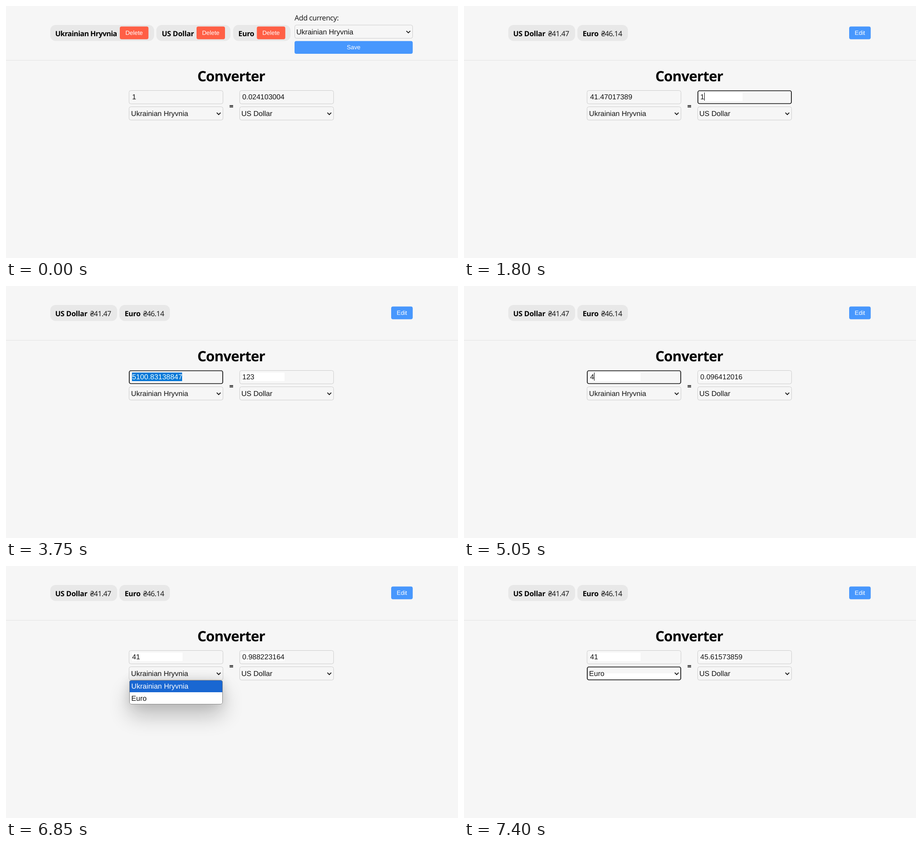
An HTML page that plays this animation: 1001x559 px, repeating every 8 s.

```html
<!DOCTYPE html>
<html lang="en">
<head>
<meta charset="utf-8">
<title>Currency converter</title>
<style>
  html, body { margin: 0; width: 100%; height: 100%; overflow: hidden; background: #f6f6f6; }
  svg { display: block; width: 1001px; height: 559px; }
  text { font: 16px "Liberation Sans", Arial, sans-serif; fill: #111; white-space: pre; text-rendering: geometricPrecision; }
  .ui { font-family: "Open Sans", "Noto Sans", sans-serif; }
  .bold { font-weight: 700; fill: #000; }
  .title { font-size: 31.5px; letter-spacing: -0.9px; }
  .btn { font-size: 13.333px; fill: #fff; }
  .mid { text-anchor: middle; }
  .box { fill: none; stroke: #cdcdcd; }
  .ring { fill: none; stroke: #101010; stroke-width: 1.7; }
  .arrow { fill: none; stroke: #111; stroke-width: 1.8; }
</style>
</head>
<body>
<svg id="stage" viewBox="0 0 1001 559"></svg>
<script>
const LOOP = 8000;
const DIGIT = 16 * 0.556, DOT = 16 * 0.278;
const SELECTION = '#0078d7', BLUE = '#4797fd', RED = '#ff5f45';
const FIELDS = {
  left: { x: 272, textX: 279.2 },
  right: { x: 517, textX: 523.3 }
};

// Each step changes only the listed properties.
const STEPS = [
  [0, { edit: true, left: '1', right: '0.024103004', unit: 'Ukrainian Hryvnia',
        focus: '', caret: false, selected: false, menu: -1, wipeLeft: 0, wipeRight: 0 }],
  [900, { edit: false }],
  [1450, { focus: 'right', caret: true }],
  [1550, { caret: false, selected: true }],
  [1800, { left: '41.47017389', right: '1', caret: true, selected: false, wipeRight: 94 }],
  [2200, { caret: false }],
  [2550, { left: '497.64208668', right: '12', caret: true }],
  [2950, { right: '123' }],
  [3000, { left: '5100.83138847' }],
  [3450, { caret: false }],
  [3650, { focus: 'left', caret: true }],
  [3750, { caret: false, selected: true }],
  [5050, { left: '4', right: '0.096412016', caret: true, selected: false, wipeLeft: 112 }],
  [5200, { left: '41', right: '0.988223164' }],
  [5600, { caret: false }],
  [6050, { caret: true }],
  [6450, { caret: false }],
  [6850, { focus: '', menu: 0 }],
  [7150, { menu: 1 }],
  [7350, { menu: -1, focus: 'unit', unit: 'Euro' }],
  [7400, { right: '45.61573859' }]
];

const states = [];
for (const [time, change] of STEPS) {
  states.push({ ...states.at(-1), ...change, time });
}

const rect = (x, y, w, h, fill, r = 0, extra = '') =>
  `<rect x="${x}" y="${y}" width="${w}" height="${h}" rx="${r}" fill="${fill}" ${extra}/>`;
const text = (x, y, str, cls = '', spacing = 0, fill = '') =>
  `<text x="${x}" y="${y}" class="${cls}" style="letter-spacing:${spacing ? spacing + 'px' : ''};fill:${fill}">${str}</text>`;
const border = (x, y, w, h = 30) => rect(x + .5, y + .5, w - 1, h - .5, 'none', 4, 'class="box"');
const ring = (x, y) => rect(x + 1, y + 1, 207, 28.5, 'none', 3.5, 'class="ring"');
const arrow = (x, y) => `<path class="arrow" d="M${x - 4.3} ${y - 2}l4.3 4.2l4.3 -4.2"/>`;
const button = (x, y, w, label, fill) =>
  rect(x, y, w, 28.2, fill, 4) + text(x + w / 2, y + 18.3, label, 'btn mid');
const chip = (x, w) => rect(x, 42, w, 35.5, '#e8e8e8', 12);
const name = (x, str, spacing) => text(x, 66.5, str, 'ui bold', spacing);

function select(x, y, w, label, textX) {
  return border(x, y, w) + text(textX, y + 21, label) + arrow(x + w - 10, y + 15.7);
}

function editHeader() {
  return chip(98, 230) + name(109, 'Ukrainian Hryvnia', -.55) + button(252, 45.5, 63.5, 'Delete', RED) +
    chip(333, 164) + name(345, 'US Dollar', -.25) + button(422, 45.5, 63, 'Delete', RED) +
    chip(503, 127) + name(514.5, 'Euro', -.3) + button(555.5, 45.5, 63, 'Delete', RED) +
    text(639, 31.5, 'Add currency:', 'ui', -.4) +
    select(639, 41.7, 262, 'Ukrainian Hryvnia', 643) +
    button(639, 77.7, 261.7, 'Save', BLUE);
}

function viewHeader() {
  return chip(98, 148) + name(109, 'US Dollar', -.25) + text(186.3, 66.5, '₴41.47', 'ui', -.55) +
    chip(251, 112) + name(262.7, 'Euro', -.3) + text(303.7, 66.5, '₴46.14', 'ui', -.55) +
    button(853, 45.5, 47.7, 'Edit', BLUE);
}

function input(side, state) {
  const { x, textX } = FIELDS[side];
  const value = state[side];
  const focused = state.focus === side;
  const marked = focused && state.selected;
  const wipe = side === 'left' ? state.wipeLeft : state.wipeRight;
  const markX = Math.floor(textX);
  const dots = value.split('.').length - 1;
  const width = (value.length - dots) * DIGIT + dots * DOT;
  let out = wipe ? rect(markX, 192, wipe, 19, '#fff') : '';
  if (marked) out += rect(markX, 192, Math.round(width), 19, SELECTION);
  out += focused ? ring(x, 187) : border(x, 187, 209);
  out += text(textX, 207, value, '', 0, marked ? '#fff' : '');
  if (focused && state.caret) out += rect(Math.round(markX + width), 192, 1, 18, '#000');
  return out;
}

function menu(active) {
  const shadow = (dy, blur, alpha) =>
    rect(273, 253 + dy, 207, 54, '#000', 5, `style="filter:blur(${blur}px)" opacity="${alpha}"`);
  const row = 253.5 + active * 26.5;
  return shadow(24, 24, .24) + shadow(0, 12, .12) +
    `<clipPath id="list">${rect(273, 253, 207, 54, '#000', 5)}</clipPath>` +
    `<g clip-path="url(#list)">${rect(273, 253, 207, 54, '#fff')}${rect(273, row, 207, 26.5, '#1967d2')}</g>` +
    rect(273.5, 253.5, 206, 53, 'none', 4.5, 'stroke="#858585"') +
    ['Ukrainian Hryvnia', 'Euro'].map((label, i) =>
      text(277.6, 272 + i * 26.5, label, '', 0, i === active ? '#fff' : '')).join('');
}

function render(state) {
  const picked = state.focus === 'unit';
  return (state.edit ? editHeader() : viewHeader()) +
    rect(0, 120, 1001, 1, '#e3e3e3') +
    text(498.5, 167, 'Converter', 'ui bold title mid') +
    input('left', state) + input('right', state) +
    text(499, 228, '=', 'ui bold mid') +
    (picked ? rect(274, 238, 205, 13, '#fff') : '') +
    select(272, 223, 209, state.unit, 277.1) +
    (picked ? ring(272, 223) : '') +
    select(517, 223, 209, 'US Dollar', 521.3) +
    (state.menu >= 0 ? menu(state.menu) : '');
}

const stage = document.getElementById('stage');
const start = performance.now();
let shown = null;

function tick() {
  const time = (performance.now() - start) % LOOP;
  const state = states.findLast(s => s.time <= time);
  if (state !== shown) {
    stage.innerHTML = render(state);
    shown = state;
  }
  requestAnimationFrame(tick);
}
tick();
</script>
</body>
</html>
```
